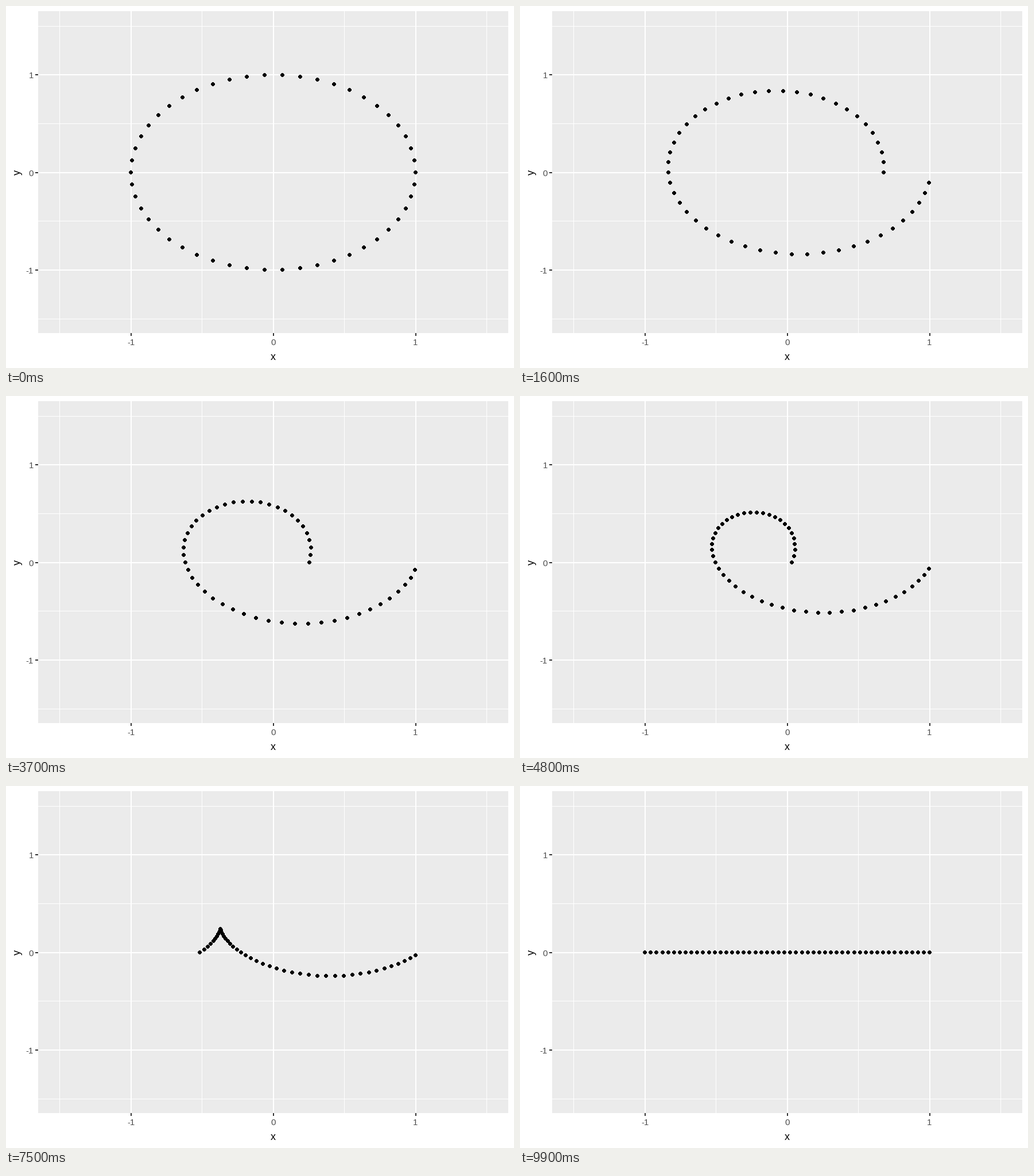
Animation of 885x632 px, one loop 10000 ms. Source, as a matplotlib script:

```python
import matplotlib.pyplot as plt
import numpy as np
from matplotlib.animation import FuncAnimation
from matplotlib.collections import PolyCollection
from matplotlib.patches import Rectangle

W, H, DPI = 885, 632, 100
LEFT, TOP, RIGHT, BOTTOM = 56, 9, 875, 571
N_DOTS, N_FRAMES = 50, 100

plt.rcParams["font.family"] = "Liberation Sans"
fig = plt.figure(figsize=(W / DPI, H / DPI), dpi=DPI, facecolor="white")
ax = fig.add_axes([0, 0, 1, 1])
ax.set(xlim=(0, W), ylim=(H, 0))
ax.axis("off")


def px(x):
    return 465.7 + 248 * x


def py(y):
    return 290.6 - 170.3 * y


def rect(x0, y0, x1, y1, color):
    ax.add_patch(Rectangle((x0, y0), x1 - x0, y1 - y0, fc=color, lw=0, snap=False))


def label(x, y, text, size, color, **kw):
    ax.text(x, y, text, fontsize=size * 72 / DPI, color=color, va="baseline",
            rotation_mode="anchor", **kw)


# Panel and grid: minor lines 1 px, major lines 2 px
rect(LEFT, TOP, RIGHT, BOTTOM, "#EBEBEB")
for v in (-1.5, -0.5, 0.5, 1.5):
    x, y = int(px(v)), int(py(v))
    rect(x, TOP, x + 1, BOTTOM, "white")
    rect(LEFT, y, RIGHT, y + 1, "white")
for v in (-1, 0, 1):
    x, y = round(px(v)), round(py(v))
    rect(x - 1, TOP, x + 1, BOTTOM, "white")
    rect(LEFT, y - 1, RIGHT, y + 1, "white")

# Ticks and labels
for v in (-1, 0, 1):
    x, y = round(px(v)), round(py(v))
    rect(x - 1, BOTTOM, x + 1, BOTTOM + 5, "#333333")
    rect(LEFT - 5, y - 1, LEFT, y + 1, "#333333")
    label(x - 0.5, 592, str(v), 15, "#4D4D4D", ha="center")
    label(48, y + 6, str(v), 15, "#4D4D4D", ha="right")
label(465.5, 618, "x", 18, "black", ha="center")
label(25, 290.5, "y", 18, "black", ha="center", rotation=90)

# Pixel-stepped disc, 7 px across
quarter = np.array([(1.5, 3.5), (1.5, 2.5), (2.5, 2.5), (2.5, 1.5), (3.5, 1.5)])
half = np.vstack([quarter, quarter[::-1] * (1, -1)])
disc = np.vstack([half, half[::-1] * (-1, 1)])

angle = 2 * np.pi * np.arange(N_DOTS) / N_DOTS
circle = np.column_stack([np.cos(angle), np.sin(angle)])
line = np.column_stack([np.linspace(-1, 1, N_DOTS), np.zeros(N_DOTS)])

dots = PolyCollection([], facecolors="black", edgecolors="none", linewidths=0, zorder=5)
dots.set_snap(False)
ax.add_collection(dots, autolim=False)


def update(i):
    t = i / (N_FRAMES - 1)
    pos = (1 - t) * circle + t * line
    centers = np.floor(np.column_stack([px(pos[:, 0]), py(pos[:, 1])])) + 0.5
    dots.set_verts(centers[:, None, :] + disc)
    return (dots,)


anim = FuncAnimation(fig, update, frames=N_FRAMES, interval=100, repeat=True,
                     repeat_delay=0, blit=False)
plt.show()
```
